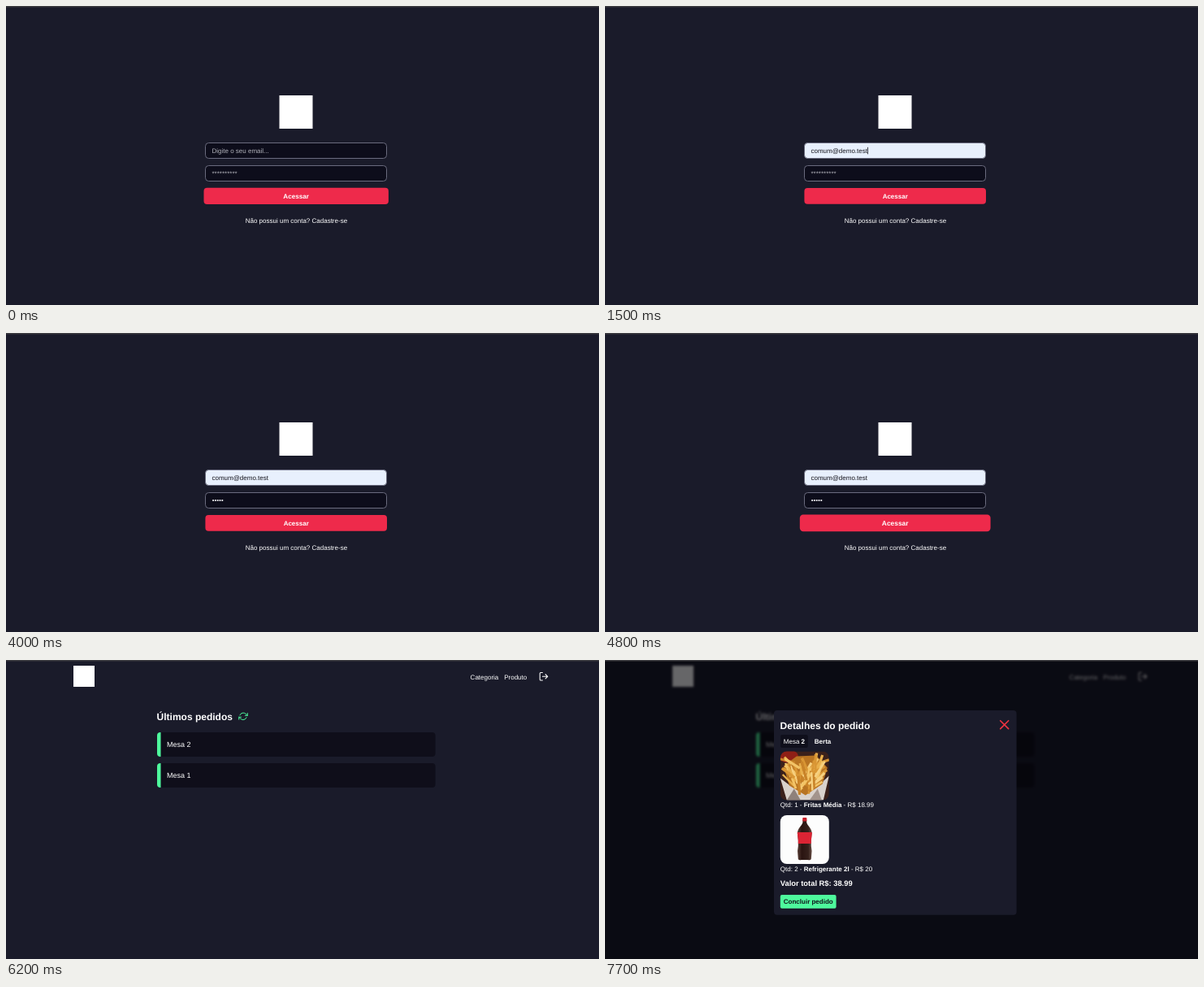
Recreate the animation shown at these times as an HTML page with a canvas. Size 730 px wide and 368 px high, loop 8 s.

```html
<!DOCTYPE html>
<html lang="pt-BR">
<head>
<meta charset="utf-8">
<title>Pizzaria - pedidos</title>
<style>
html, body { margin: 0; width: 100%; height: 100%; overflow: hidden; background: #1a1b2a; }
canvas { display: block; width: 730px; height: 368px; }
</style>
</head>
<body>
<canvas id="stage"></canvas>
<script>
const W = 730, H = 368, LOOP = 8000, STEP = 100;
const SANS = '"Liberation Sans", Arial, sans-serif';
const BG = '#1a1b2a', FIELD = '#0d0d1b', RED = '#ee2a4b', GREEN = '#4ef99d', WHITE = '#fff';
const BORDER = '#6a6b7e', HINT = '#b0b1b9', INK = '#14141c';
const EMAIL = 'comum@demo.test';
const dpr = window.devicePixelRatio || 1;

function setup(canvas) {
  canvas.width = W * dpr;
  canvas.height = H * dpr;
  const g = canvas.getContext('2d');
  g.scale(dpr, dpr);
  g.textRendering = 'geometricPrecision';
  return g;
}

const view = setup(document.getElementById('stage'));

function box(g, x, y, w, h, r, fill, stroke) {
  g.beginPath();
  g.roundRect(x, y, w, h, r);
  if (fill) { g.fillStyle = fill; g.fill(); }
  if (stroke) { g.strokeStyle = stroke; g.lineWidth = 1; g.stroke(); }
}

// Draws text and returns the x where it ends.
function text(g, str, x, y, size, { color = WHITE, weight = 400, align = 'left', family = SANS } = {}) {
  g.font = `${weight} ${size}px ${family}`;
  g.textAlign = align;
  g.fillStyle = color;
  g.fillText(str, x, y);
  return x + g.measureText(str).width;
}

// Draws [string, weight] pairs one after another.
function runs(g, parts, x, y, size) {
  for (const [str, weight] of parts) x = text(g, str, x, y, size, { weight });
}

// Strokes a path from a 24-unit grid around a centre.
function icon(g, d, cx, cy, scale, color) {
  g.save();
  g.translate(cx, cy);
  g.scale(scale, scale);
  g.translate(-12, -12);
  g.lineWidth = 2;
  g.lineCap = g.lineJoin = 'round';
  g.strokeStyle = color;
  g.stroke(new Path2D(d));
  g.restore();
}

function poly(g, points, fill) {
  g.beginPath();
  points.forEach(([x, y]) => g.lineTo(x, y));
  g.closePath();
  g.fillStyle = fill;
  g.fill();
}

function background(g) {
  g.fillStyle = BG;
  g.fillRect(0, 0, W, H);
}

function windowEdge(g) {
  g.fillStyle = '#3c3c40';
  g.fillRect(0, 0, W, 1.5);
}

// --- Login ---

const lerp = (a, b, k) => a + (b - a) * k;
const ease = k => k * k * (3 - 2 * k);

// Interpolates [time, value] keys.
function track(keys, t) {
  let i = keys.findIndex(k => k[0] > t);
  if (i < 0) return keys[keys.length - 1][1];
  if (i === 0) return keys[0][1];
  const [t0, a] = keys[i - 1], [t1, b] = keys[i];
  return lerp(a, b, ease((t - t0) / (t1 - t0)));
}

const hover = [[0, 1.017], [100, 1.026], [200, 1.017], [300, 1.006], [400, 1], [4300, 1], [4700, 1.05]];
const keyTimes = [2700, 3000, 3100, 3300, 3400];
const between = (t, a, b) => t >= a && t < b;

function caret(g, x, y, color) {
  g.fillStyle = color;
  g.fillRect(x, y, 0.8, 8.5);
}

function field(g, y, fill) {
  box(g, 245.5, y + 0.5, 223, 19, 4, fill, BORDER);
}

function emailField(g, t) {
  const filled = t >= 1200;
  field(g, 168, filled ? '#e8f0fd' : FIELD);
  text(g, filled ? EMAIL : 'Digite o seu email...', 253.5, 180.8, 8, { color: filled ? INK : HINT });
  if (between(t, 700, 1200)) caret(g, 253.4, 173.8, '#e8e8ee');
  if (between(t, 1500, 1800)) caret(g, 323.2, 173.8, INK);
}

function passwordField(g, t) {
  field(g, 196, FIELD);
  const typed = keyTimes.filter(k => k <= t).length;
  if (!typed) text(g, '*'.repeat(10), 253.5, 208.7, 8, { color: HINT });
  g.fillStyle = '#f2f2f5';
  for (let i = 0; i < typed; i++) {
    g.beginPath();
    g.arc(255.1 + i * 2.8, 206, 1.1, 0, 7);
    g.fill();
  }
  if (between(t, 1900, 2400) || between(t, 2700, 4000)) caret(g, 253.5 + typed * 2.8, 201.6, '#e8e8ee');
}

function button(g, scale) {
  g.save();
  g.translate(357.2, 233.9);
  g.scale(scale, scale);
  box(g, -111.8, -9.9, 223.6, 19.8, 4, RED);
  text(g, 'Acessar', 0, 2.8, 8, { weight: 700, align: 'center' });
  g.restore();
}

function suggestion(g, t) {
  if (!between(t, 800, 1500)) return;
  box(g, 294.3, 192.3, 94.7, 22, 2, t >= 1200 ? '#33332c' : '#20201c');
  text(g, EMAIL, 300.3, 206.2, 7.5, { family: '"Noto Sans", "Open Sans", sans-serif' });
}

function login(g, t) {
  background(g);
  g.fillStyle = WHITE;
  g.fillRect(336.5, 110, 41, 41);
  emailField(g, t);
  passwordField(g, t);
  button(g, track(hover, t));
  text(g, 'Não possui um conta? Cadastre-se', 357.4, 266.9, 8, { align: 'center' });
  suggestion(g, t);
}

// --- Orders ---

const REFRESH = 'M23 4v6h-6M1 20v-6h6M3.51 9a9 9 0 0 1 14.85-3.36L23 10M1 14l4.64 4.36A9 9 0 0 0 20.49 15';
const LOGOUT = 'M9 21H5a2 2 0 0 1-2-2V5a2 2 0 0 1 2-2h4M16 17l5-5-5-5M21 12H9';
const CLOSE = 'M18 6L6 18M6 6l12 12';

function order(g, label, y) {
  g.save();
  g.beginPath();
  g.roundRect(186, y, 342.6, 30, 4);
  g.clip();
  g.fillStyle = '#0f0e1a';
  g.fillRect(186, y, 343, 30);
  g.fillStyle = GREEN;
  g.fillRect(186, y, 4.5, 30);
  g.restore();
  text(g, label, 198, y + 18.1, 9);
}

function orders(g) {
  background(g);
  g.fillStyle = WHITE;
  g.fillRect(83, 7, 26, 26);
  text(g, 'Categoria', 571.6, 23.9, 8);
  text(g, 'Produto', 613.2, 23.9, 8);
  icon(g, LOGOUT, 662, 20.3, 0.53, WHITE);
  text(g, 'Últimos pedidos', 185.6, 74.2, 12, { weight: 700 });
  icon(g, REFRESH, 292, 69.3, 0.48, GREEN);
  order(g, 'Mesa 2', 89);
  order(g, 'Mesa 1', 127);
}

// --- Order details ---

function fries(g, x, y) {
  let seed = 11;
  const rnd = () => (seed = seed * 16807 % 2147483647) / 2147483647;
  g.save();
  g.beginPath();
  g.roundRect(x, y, 60, 60, 8);
  g.clip();
  g.translate(x, y);
  g.fillStyle = '#3b211b';
  g.fillRect(0, 0, 60, 60);
  g.fillStyle = '#8f1f16';
  g.beginPath();
  g.ellipse(10, 6, 12, 8, 0, 0, 7);
  g.fill();
  poly(g, [[0, 33], [12, 42], [47, 42], [60, 30], [53, 60], [8, 60]], '#d9d2cc');
  poly(g, [[8, 60], [17, 46], [25, 60]], '#8f817b');
  poly(g, [[36, 60], [46, 46], [51, 60]], '#a3948c');
  poly(g, [[4, 18], [20, 6], [44, 5], [58, 20], [52, 40], [31, 54], [11, 42]], '#b87422');
  const tones = ['#e9b04c', '#f3c467', '#d99634', '#f6d080', '#c98328'];
  for (let i = 0; i < 58; i++) {
    const cx = 9 + rnd() * 43, cy = 11 + rnd() * 31;
    const lean = (cx - 30) / 26 + (rnd() - 0.5) * 1.1, half = 6 + rnd() * 6;
    g.strokeStyle = tones[i % tones.length];
    g.lineWidth = 2.4 + rnd() * 1.2;
    g.beginPath();
    g.moveTo(cx + Math.sin(lean) * half, cy - Math.cos(lean) * half);
    g.lineTo(cx - Math.sin(lean) * half, cy + Math.cos(lean) * half);
    g.stroke();
  }
  g.restore();
}

function bottle(g, x, y) {
  box(g, x, y, 60, 60, 8, '#fdfdfd');
  g.save();
  g.translate(x + 30, y);
  g.save();
  g.clip(new Path2D('M-2.4 6H2.4V9C3.5 13 8.5 16 9 22L8 31Q7.6 38 8.8 44L8 54Q7 56 4 55H-4Q-7 56-8 54L-8.8 44Q-7.6 38-8 31L-9 22C-8.5 16-3.5 13-2.4 9Z'));
  const body = g.createLinearGradient(-9, 0, 9, 0);
  body.addColorStop(0, '#5a4038');
  body.addColorStop(0.3, '#2a1411');
  body.addColorStop(0.75, '#35201b');
  body.addColorStop(1, '#6a5048');
  g.fillStyle = body;
  g.fillRect(-10, 5, 20, 52);
  g.fillStyle = '#dc2434';
  g.fillRect(-10, 21, 20, 14);
  g.restore();
  box(g, -2.6, 3, 5.2, 4.4, 1, '#c8202c');
  g.restore();
}

function details(g) {
  box(g, 208, 62, 298.6, 251.8, 4, BG);
  text(g, 'Detalhes do pedido', 215.6, 84.8, 12, { weight: 700 });
  icon(g, CLOSE, 491.7, 79.7, 0.83, '#ee3340');
  box(g, 216, 92, 33.8, 16, 2, '#0f0f1b');
  runs(g, [['Mesa ', 400], ['2', 700]], 219.8, 102.7, 8);
  text(g, 'Berta', 257.8, 102.7, 8, { weight: 700 });
  fries(g, 215.8, 112.5);
  runs(g, [['Qtd: 1 - ', 400], ['Fritas Média', 700], [' - R$ 18.99', 400]], 215.8, 181.2, 8);
  bottle(g, 215.8, 191);
  runs(g, [['Qtd: 2 - ', 400], ['Refrigerante 2l', 700], [' - R$ 20', 400]], 215.8, 259.9, 8);
  text(g, 'Valor total R$: 38.99', 215.8, 278.4, 9.36, { weight: 700 });
  box(g, 215.8, 289, 68.8, 16.8, 2, GREEN);
  text(g, 'Concluir pedido', 219.8, 299.9, 8, { weight: 700, color: '#10131a' });
}

const page = document.createElement('canvas');
orders(setup(page));

function modal(g) {
  background(g);
  g.filter = `blur(${1.5 * dpr}px)`;
  g.drawImage(page, 0, 0, W, H);
  g.filter = 'none';
  g.fillStyle = 'rgba(0, 1, 4, 0.6)';
  g.fillRect(0, 0, W, H);
  details(g);
}

function draw(now) {
  // The screen advances ten times a second.
  const t = Math.floor(now % LOOP / STEP) * STEP;
  if (t < 4900) login(view, t);
  else if (t < 6400) view.drawImage(page, 0, 0, W, H);
  else modal(view);
  windowEdge(view);
  requestAnimationFrame(() => draw(performance.now()));
}

draw(performance.now());
</script>
</body>
</html>
```
